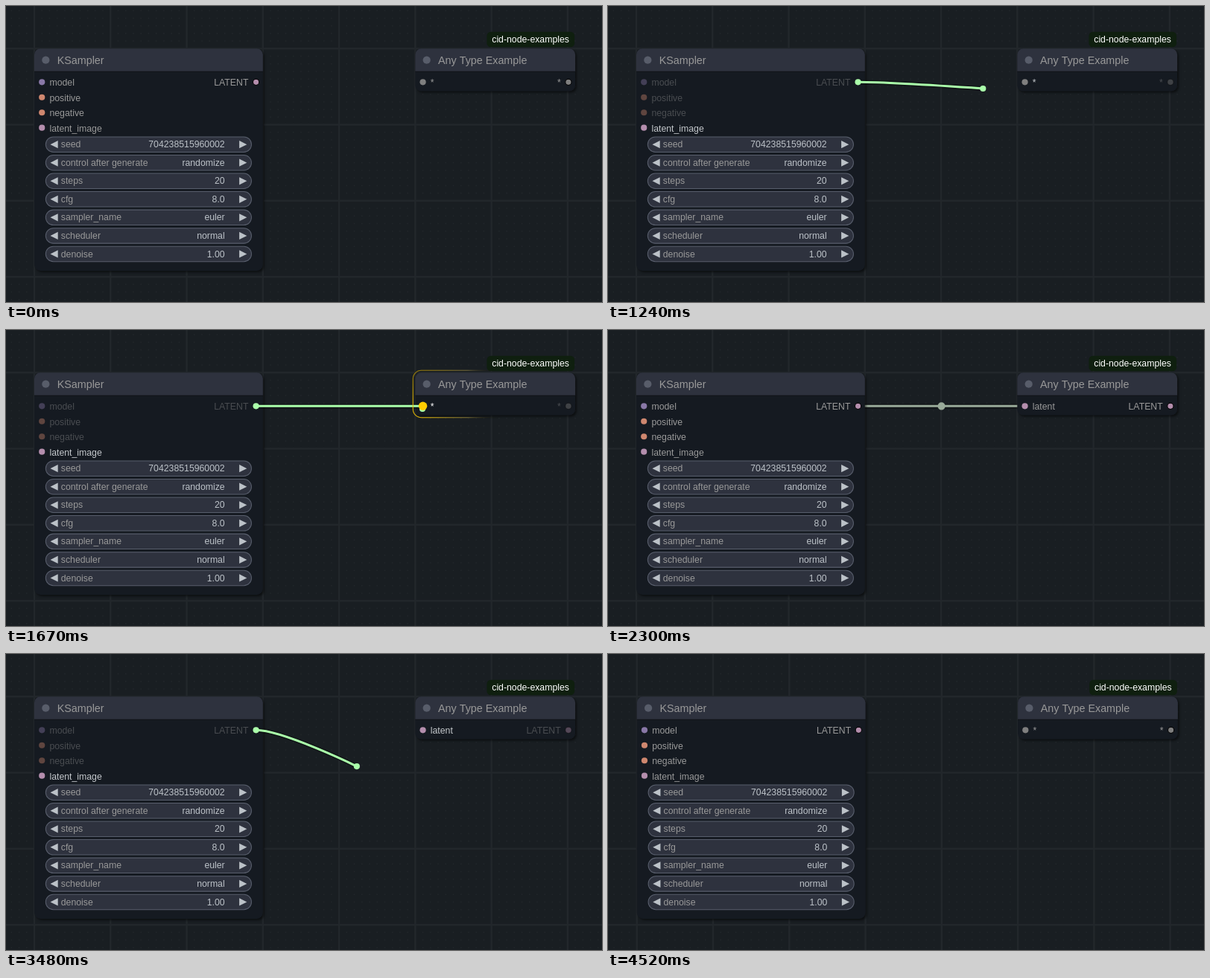
These frames come from a looping animation (800x398 px, 5030 ms). An HTML page with a canvas:

```html
<!DOCTYPE html>
<html lang="en">
<head>
<meta charset="utf-8">
<title>Any type slot</title>
<style>
  html, body { margin: 0; width: 100%; height: 100%; overflow: hidden; background: #191e22; }
  canvas { display: block; }
</style>
</head>
<body>
<canvas id="stage" width="800" height="398"></canvas>
<script>
const ctx = document.getElementById('stage').getContext('2d');
const LOOP = 5030;
const SCALE = 1.0227, ORIGIN = { x: 38, y: 88 };
const SANS = '"Liberation Sans", Arial, sans-serif';
const COLOR = {
  back: '#191e22', line: '#22272b', dot: '#22272b',
  title: '#2e323e', body: '#151a21', box: '#585d6a',
  text: '#999', bright: '#c4c8cc', value: '#bcc2c8',
  widget: '#2e323e', outline: '#585e6c',
  model: '#8978a7', conditioning: '#cf876f', latent: '#b48ead', any: '#7f7f7f',
  drag: '#afa', link: '#9a9', snap: '#ffcc00'
};
const WIDGETS = [
  ['seed', '704238515960002'], ['control after generate', 'randomize'], ['steps', '20'],
  ['cfg', '8.0'], ['sampler_name', 'euler'], ['scheduler', 'normal'], ['denoise', '1.00']
];
const MENU = [
  ['Add Node', 161], ['Search', 177], ['Reroute', 193], ['Reroute', 206],
  ['KSampler', 218.7], ['VAEDecode', 231.5], ['LatentUpscale', 244.3], ['LatentUpscaleBy', 257.2]
];
const SAMPLER = { x: 0, width: 300, height: 262 };
const ANY_NODE = { x: 500, width: 210, height: 26 };
const OUT = { x: 291, y: 14 }, IN = { x: 510, y: 14 };

// Cursor keyframes: time, stage x, stage y
const CONNECT = [[1120, 345, 103], [1240, 503, 111], [1360, 544, 109], [1640, 559, 106]];
const DETACH = [[3330, 555, 104], [3480, 471, 151], [3640, 444, 160]];

const between = (t, from, to) => t >= from && t < to;
const clamp = v => Math.min(1, Math.max(0, v));

function along(keys, t) {
  let i = 1;
  while (i < keys.length - 1 && t > keys[i][0]) i++;
  const [t0, x0, y0] = keys[i - 1], [t1, x1, y1] = keys[i];
  const k = clamp((t - t0) / (t1 - t0));
  return {
    x: (x0 + (x1 - x0) * k - ORIGIN.x) / SCALE,
    y: (y0 + (y1 - y0) * k - ORIGIN.y) / SCALE
  };
}

function text(str, x, y, color, size = 12, align = 'left') {
  ctx.font = `${size}px ${SANS}`;
  ctx.textAlign = align;
  ctx.fillStyle = color;
  ctx.fillText(str, x, y);
}

function circle(x, y, r, color, stroke) {
  ctx.beginPath();
  ctx.arc(x, y, r, 0, Math.PI * 2);
  ctx.fillStyle = color;
  ctx.fill();
  if (stroke) {
    ctx.strokeStyle = '#000';
    ctx.lineWidth = 1;
    ctx.stroke();
  }
}

function roundRect(x, y, w, h, r, fill) {
  ctx.beginPath();
  ctx.roundRect(x, y, w, h, r);
  if (fill) {
    ctx.fillStyle = fill;
    ctx.fill();
  }
}

const gridDots = new Path2D();
for (let x = -40; x < 750; x += 10)
  for (let y = -90; y < 310; y += 10) gridDots.rect(x - 0.75, y - 0.75, 1.5, 1.5);

function drawGrid() {
  ctx.fillStyle = COLOR.dot;
  ctx.fill(gridDots);
  ctx.fillStyle = COLOR.line;
  for (let x = 0; x < 750; x += 100) ctx.fillRect(x - 1.2, -90, 2.4, 400);
  for (let y = -30; y < 310; y += 100) ctx.fillRect(-40, y - 1.2, 800, 2.4);
}

function drawFrame(node, title) {
  ctx.save();
  ctx.shadowColor = 'rgba(0,0,0,.5)';
  ctx.shadowBlur = 3;
  ctx.shadowOffsetX = ctx.shadowOffsetY = 2;
  roundRect(0, -30, node.width, node.height + 30, 8, COLOR.body);
  ctx.restore();
  roundRect(0, -30, node.width, 30, [8, 8, 0, 0], COLOR.title);
  ctx.fillStyle = 'rgba(0,0,0,.2)';
  ctx.fillRect(0, -1, node.width, 2);
  circle(15, -15, 5, COLOR.box);
  text(title, 30, -10, COLOR.text, 14);
}

function inputSlot(row, label, color, { dim, tone = COLOR.text, r = 4 } = {}) {
  const y = 14 + row * 20;
  ctx.globalAlpha = dim ? 0.4 : 1;
  circle(10, y, r, color);
  text(label, 20, y + 5, tone);
  ctx.globalAlpha = 1;
}

function outputSlot(node, label, color, dim) {
  const x = node.width - 9;
  ctx.globalAlpha = dim ? 0.4 : 1;
  circle(x, 14, 4, color, true);
  text(label, x - 10, 19, COLOR.text, 12, 'right');
  ctx.globalAlpha = 1;
}

function arrow(x, y, dir) {
  ctx.beginPath();
  ctx.moveTo(x, y + 5);
  ctx.lineTo(x + 10 * dir, y + 10);
  ctx.lineTo(x, y + 15);
  ctx.fillStyle = COLOR.value;
  ctx.fill();
}

function drawSampler(dragging) {
  drawFrame(SAMPLER, 'KSampler');
  inputSlot(0, 'model', COLOR.model, { dim: dragging });
  inputSlot(1, 'positive', COLOR.conditioning, { dim: dragging });
  inputSlot(2, 'negative', COLOR.conditioning, { dim: dragging });
  inputSlot(3, 'latent_image', COLOR.latent, { tone: dragging ? COLOR.bright : COLOR.text });
  outputSlot(SAMPLER, 'LATENT', COLOR.latent, dragging);
  WIDGETS.forEach(([label, value], i) => {
    const y = 86 + i * 24;
    roundRect(15, y, 270, 20, 10, COLOR.widget);
    ctx.strokeStyle = COLOR.outline;
    ctx.lineWidth = 1;
    ctx.stroke();
    arrow(31, y, -1);
    arrow(269, y, 1);
    text(label, 35, y + 14, COLOR.text);
    text(value, 250, y + 14, COLOR.value, 12, 'right');
  });
}

function drawAnyNode({ dragging, linked, hovered, snapped }) {
  ctx.save();
  ctx.translate(ANY_NODE.x, 0);
  drawFrame(ANY_NODE, 'Any Type Example');
  roundRect(94, -52, 115, 20, 5, '#0f1f0f');
  text('cid-node-examples', 202, -38, '#fff', 12, 'right');
  const color = linked ? COLOR.latent : COLOR.any;
  inputSlot(0, linked ? 'latent' : '*', color, {
    tone: hovered || snapped ? '#fff' : dragging ? COLOR.bright : COLOR.text,
    r: hovered ? 5 : 4
  });
  outputSlot(ANY_NODE, linked ? 'LATENT' : '*', color, dragging);
  ctx.restore();
}

function drawLink(end, color, endDirected) {
  const reach = Math.hypot(end.x - OUT.x, end.y - OUT.y) / 4;
  ctx.beginPath();
  ctx.moveTo(OUT.x, OUT.y);
  ctx.bezierCurveTo(OUT.x + reach, OUT.y, end.x - (endDirected ? reach : 0), end.y, end.x, end.y);
  ctx.lineWidth = 6;
  ctx.strokeStyle = 'rgba(0,0,0,.35)';
  ctx.stroke();
  ctx.lineWidth = 3;
  ctx.strokeStyle = color;
  ctx.stroke();
}

function drawSnap() {
  circle(IN.x, IN.y, 5.6, COLOR.snap);
  const x = ANY_NODE.x - 3, width = ANY_NODE.width + 6;
  const glow = ctx.createRadialGradient(IN.x, IN.y, 0, IN.x, IN.y, 108);
  glow.addColorStop(0, COLOR.snap);
  glow.addColorStop(1, 'rgba(0,0,0,0)');
  const sheen = ctx.createLinearGradient(x, 0, x + width, 0);
  sheen.addColorStop(0, 'rgba(255,204,0,.33)');
  sheen.addColorStop(0.33, 'rgba(221,200,120,.4)');
  sheen.addColorStop(0.5, 'rgba(0,0,0,0)');
  roundRect(x, -33, width, ANY_NODE.height + 36, 11);
  ctx.lineWidth = 1;
  for (const style of [glow, sheen]) {
    ctx.strokeStyle = style;
    ctx.stroke();
  }
}

function drawMenu() {
  ctx.save();
  ctx.shadowColor = '#000';
  ctx.shadowBlur = 6;
  ctx.fillStyle = '#15171a';
  ctx.fillRect(438, 141, 70, 124);
  ctx.restore();
  ctx.fillStyle = '#0c0d0f';
  ctx.fillRect(439, 142, 68, 12);
  text('LATENT | LATENT', 440, 150.7, '#ddd', 7.7);
  for (const [label, y] of MENU) text(label, 441.5, y + 2.8, '#bbb', 7.8);
  ctx.fillStyle = '#666';
  for (const y of [168.5, 184]) ctx.fillRect(439, y, 68, 1);
}

function draw(t) {
  const connecting = between(t, 1120, 1850);
  const detaching = between(t, 3330, 3850);
  const dragging = connecting || detaching;
  const cursor = dragging && along(connecting ? CONNECT : DETACH, t);
  const linked = between(t, 1850, 3850);
  const hovered = between(t, 1850, 1910) || between(t, 2640, 3330);
  const snapped = connecting && cursor.x > ANY_NODE.x;
  const pan = t < 4300 ? 0 : 0.75 * clamp((t - 4250) / 270);

  ctx.setTransform(1, 0, 0, 1, 0, 0);
  ctx.fillStyle = COLOR.back;
  ctx.fillRect(0, 0, 800, 398);
  ctx.setTransform(SCALE, 0, 0, SCALE, ORIGIN.x + pan, ORIGIN.y);
  drawGrid();
  if (linked && !dragging) {
    drawLink(IN, COLOR.link, true);
    circle((OUT.x + IN.x) / 2, OUT.y, 5, COLOR.link);
  }
  drawSampler(dragging);
  drawAnyNode({ dragging, linked, hovered, snapped });
  if (dragging) {
    drawLink(snapped ? IN : cursor, COLOR.drag, snapped);
    circle(OUT.x, OUT.y, 4, COLOR.drag);
    circle(cursor.x, cursor.y, 4, COLOR.drag);
  }
  if (snapped) drawSnap();
  ctx.setTransform(1, 0, 0, 1, 0, 0);
  if (between(t, 3850, 4300)) drawMenu();
}

const start = performance.now();
function tick() {
  draw((performance.now() - start) % LOOP);
  requestAnimationFrame(tick);
}
tick();
</script>
</body>
</html>
```
